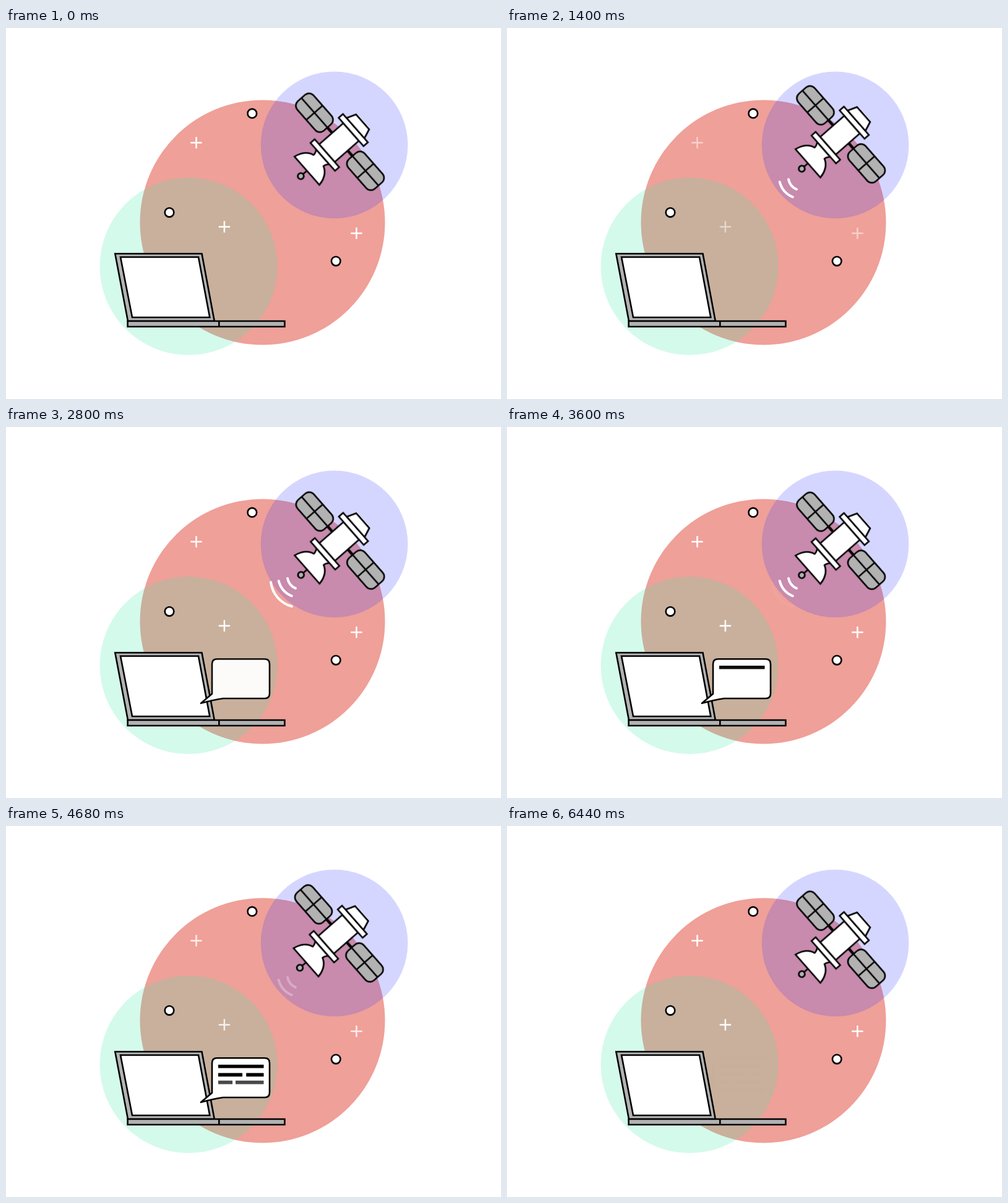
An HTML page without scripts that plays this animation: 800 by 600 pixels, repeating every 6.48 s.

```html
<!DOCTYPE html>
<html lang="en">
<head>
<meta charset="utf-8">
<title>Satellite message</title>
<style>
html, body { margin: 0; width: 100%; height: 100%; overflow: hidden; background: #fff; }
svg { display: block; width: 800px; height: 600px; }

.ink { stroke: #000; stroke-width: 2.6; fill: #fff; }
.grey { fill: #b2b2b2; }
.wave { fill: none; stroke: #fff; stroke-width: 4; stroke-linecap: round; }
.cross { stroke: #fff; stroke-width: 2.5; }

.sat, .wave, .cross, .bubble, .line {
  animation: 6480ms ease infinite both;
}
.sat { animation-name: drift; }
.cross { animation-name: twinkle; }
.bubble { animation-name: bubble; }
.w1 { animation-name: wave1; }
.w2 { animation-name: wave2; }
.w3 { animation-name: wave3; }
.l1 { animation-name: line1; }
.l2 { animation-name: line2; }
.l3 { animation-name: line3; }
.l4 { animation-name: line4; }

@keyframes drift {
  0%, 48%, 58%, 100% { transform: translate(0, 0); }
  12%, 68% { transform: translate(-5.2px, -6px); }
  22%, 78% { transform: translate(0, -12px); }
  32%, 88%, 94% { transform: translate(5.3px, -6px); }
}
@keyframes twinkle {
  0%, 48%, 58%, 100% { opacity: 1; }
  12%, 32% { opacity: .5; }
  88%, 94% { opacity: .78; }
}
@keyframes bubble {
  0%, 32%, 100% { opacity: 0; }
  48%, 94% { opacity: 1; }
}

/* waves switch on one by one, the outer one leaves first */
@keyframes wave1 {
  0%, 78%, 100% { opacity: 0; }
  12%, 68% { opacity: 1; }
}
@keyframes wave2 {
  0%, 12%, 78%, 100% { opacity: 0; }
  22%, 68% { opacity: 1; }
}
@keyframes wave3 {
  0%, 22%, 58%, 100% { opacity: 0; }
  32%, 49% { opacity: 1; }
}

@keyframes line1 { 0%, 49% { opacity: 0; } 58%, 100% { opacity: 1; } }
@keyframes line2 { 0%, 58% { opacity: 0; } 68%, 100% { opacity: 1; } }
@keyframes line3 { 0%, 68% { opacity: 0; } 78%, 100% { opacity: 1; } }
@keyframes line4 { 0%, 78% { opacity: 0; } 88%, 100% { opacity: 1; } }
</style>
</head>
<body>
<svg viewBox="0 0 800 600">
  <defs>
    <path id="plus" d="M-9.2 0H9.2M0-9.2V9.2"/>
    <g id="panel" class="ink">
      <path d="M0 31V44" stroke-width="4.5"/>
      <rect class="grey" x="-17.5" y="30.7" width="35" height="63.6" rx="10"/>
      <path d="M0 30.7V94.3M-17.5 62.5H17.5"/>
    </g>
  </defs>

  <circle cx="414.5" cy="314.5" r="198" fill="#efa098"/>
  <circle cx="295" cy="385.5" r="143.5" fill="rgb(60,232,168)" fill-opacity=".22"/>
  <circle cx="530.6" cy="189.2" r="118.8" fill="rgb(45,50,255)" fill-opacity=".2"/>

  <g class="cross">
    <use href="#plus" x="307.5" y="185.5"/>
    <use href="#plus" x="352.9" y="321.5"/>
    <use href="#plus" x="566.4" y="332"/>
  </g>

  <g class="ink">
    <circle cx="397.8" cy="138.2" r="7.3"/>
    <circle cx="264" cy="298.3" r="7.3"/>
    <circle cx="533.2" cy="377.1" r="7.3"/>
  </g>

  <g class="ink">
    <path class="grey" d="M176.3 365H316.5L336.8 474H197Z"/>
    <path d="M185 370.5H311L329.3 468H204Z"/>
    <path class="grey" d="M196.6 474H450.4V483H196.6ZM344.3 474V483"/>
  </g>

  <path class="wave w1" d="M455 244.8A22 22 0 0 0 468 260.8"/>
  <path class="wave w2" d="M440.7 249A36 36 0 0 0 461.8 273.3"/>
  <path class="wave w3" d="M428 251A46 46 0 0 0 461.8 290"/>

  <g class="sat">
    <g class="ink" transform="translate(539.7 184) rotate(-41.3)">
      <path d="M0 -31V-17M0 17V31" stroke-width="4.5"/>
      <use href="#panel"/>
      <use href="#panel" transform="scale(1 -1)"/>
      <path d="M-80 0H-70"/>
      <circle class="grey" cx="-84.2" cy="0" r="4.9"/>
      <path d="M-71-30.5C-58-28-49-21-46-12Q-42-12-37-16V16Q-42 12-46 12C-49 21-58 28-71 30.5Z"/>
      <path d="M33-22L48.7-16V16L33 22Z"/>
      <rect x="-28" y="-19" width="52" height="38"/>
      <rect x="-37" y="-30" width="9" height="60"/>
      <rect x="24" y="-30.5" width="9.3" height="61"/>
    </g>
  </g>

  <g class="bubble">
    <path class="ink" stroke-width="3" stroke-linejoin="round"
      d="M341 375.3H418Q426 375.3 426 383.3V431Q426 439 418 439H351Q336 441 315 446.8L333 431.5V383.3Q333 375.3 341 375.3Z"/>
    <path class="line l1" d="M343 386H416.5V391.6H343Z"/>
    <path class="line l2" d="M343 399.6H382V405.2H343ZM388.2 399.6H416.5V405.2H388.2Z"/>
    <path class="line l3" d="M343 411.8H366V417.4H343ZM371 411.8H416.5V417.4H371Z"/>
    <path class="line l4" d="M343 423.8H416.5V429.4H343Z"/>
  </g>
</svg>
</body>
</html>
```
